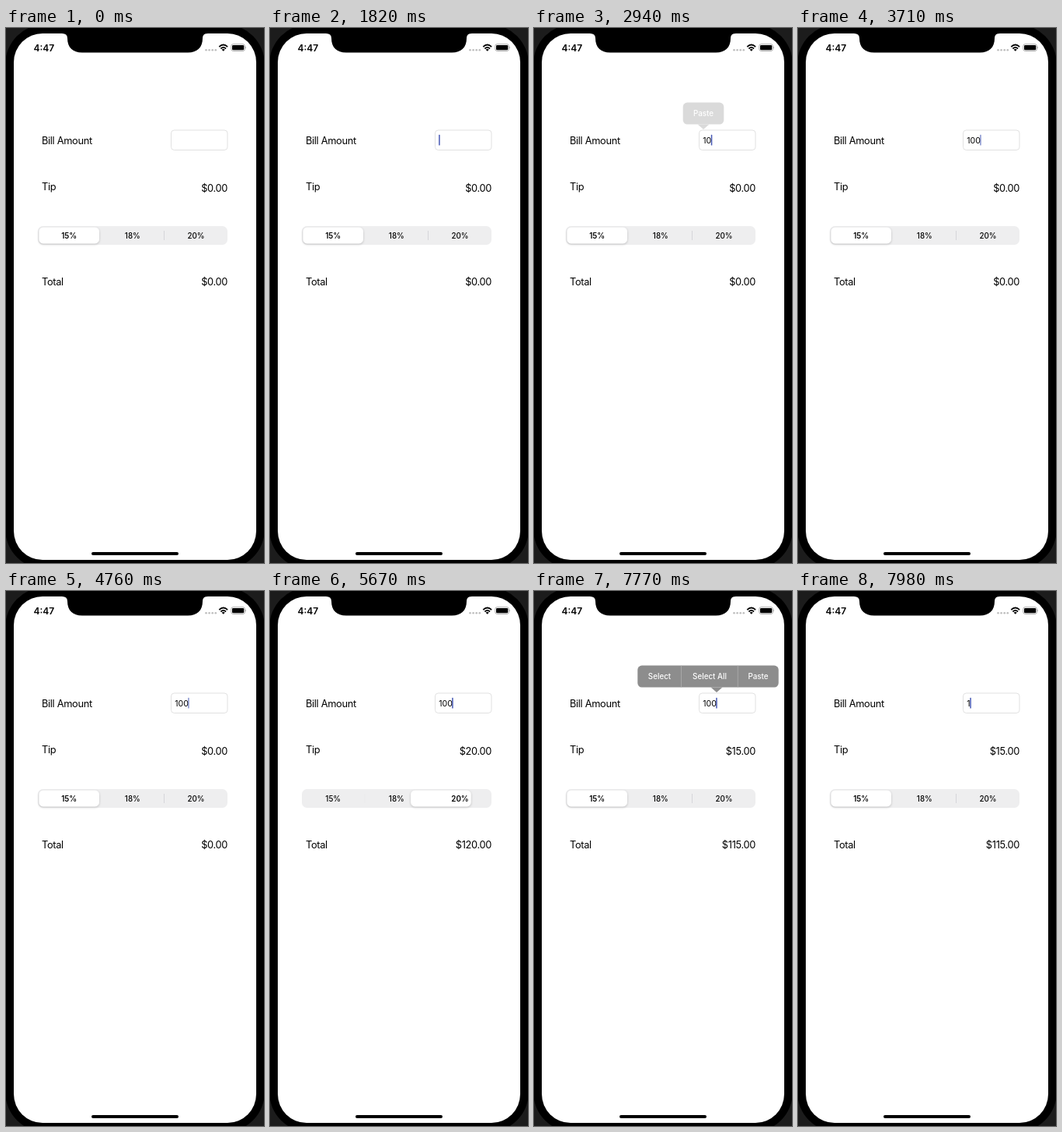
Write an HTML page that moves like this. It is 332 by 686 pixels and loops after 8 s.

```html
<!DOCTYPE html>
<html lang="en">
<head>
<meta charset="utf-8">
<title>Tip calculator</title>
<style>
  html, body { margin: 0; width: 100%; height: 100%; overflow: hidden; background: #1c1c1c; }
  svg { display: block; width: 332px; height: 686px; font: 12.8px Inter, "Liberation Sans", sans-serif; }
  .label { letter-spacing: -.32px; }
  .end, .end text { text-anchor: end; }
  .mid { text-anchor: middle; font-size: 9.8px; font-weight: 500; }
  #thumb { filter: drop-shadow(0 1px 1.5px rgba(0, 0, 0, .2)); }
</style>
</head>
<body>
<svg viewBox="0 0 332 686">
  <rect x="-1" y="-5" width="334" height="699" rx="52"/>
  <rect x="10" y="7" width="312" height="675" rx="37" fill="#fff"/>
  <path d="M72 6V7Q79 7 79 13C79 25 86 31.5 98 31.5H234C246 31.5 253 25 253 13Q253 7 260 7V6Z"/>

  <text x="35.5" y="29.6" font-size="12" font-weight="600">4:47</text>
  <g fill="#bdbdbd">
    <circle cx="257.5" cy="28.3" r="1.3"/><circle cx="261.6" cy="28.3" r="1.3"/>
    <circle cx="265.7" cy="28.3" r="1.3"/><circle cx="269.8" cy="28.3" r="1.3"/>
  </g>
  <g fill="none" stroke="#000" stroke-width="1.8">
    <path d="M274.3 24.2Q279.7 18.8 285.1 24.2M276.4 26.5Q279.7 23.3 283 26.5"/>
  </g>
  <path d="M277.7 27.7Q279.7 26 281.7 27.7L279.7 29.8Z"/>
  <rect x="289.8" y="20.7" width="17.6" height="8.8" rx="2.5" fill="none" stroke="#999" stroke-width=".8"/>
  <rect x="291" y="21.9" width="15.2" height="6.4" rx="1.4"/>
  <path d="M308.4 23.5Q310 25 308.4 26.7Z" fill="#999"/>

  <g class="label">
    <text x="46" y="148.7">Bill Amount</text>
    <text x="46" y="207.6">Tip</text>
    <text x="46" y="329.6">Total</text>
    <g class="end">
      <text id="tip" x="285" y="210.2"></text>
      <text id="total" x="285" y="329.6"></text>
    </g>
  </g>

  <rect x="212.5" y="131" width="72.5" height="25.5" rx="4" fill="#fff" stroke="#dedede" stroke-width=".9"/>
  <text id="bill" x="217.2" y="147.5" font-size="10.6"></text>
  <rect id="caret" y="136.8" width="1.5" height="13.8" rx=".7" fill="#4658b4"/>

  <rect x="41" y="254" width="244" height="24" rx="6.5" fill="#eeeeef"/>
  <g stroke="#d3d3d6" stroke-width=".9">
    <path id="sepA" d="M121.8 260V272"/>
    <path id="sepB" d="M203.5 260V272"/>
  </g>
  <rect id="thumb" y="255.4" width="77.6" height="21" rx="5.4" fill="#fff"/>
  <g class="mid" id="segments">
    <text x="81.2" y="269.5">15%</text>
    <text x="162.8" y="269.5">18%</text>
    <text x="244.5" y="269.5">20%</text>
  </g>

  <g id="pasteMenu" fill="#1e1e1e">
    <rect x="191.7" y="95.6" width="52.6" height="28" rx="5.5"/>
    <path d="M210.5 123.4H225.5L218 130Z"/>
    <text class="mid" x="218" y="113.2" fill="#fff">Paste</text>
  </g>
  <g id="selectMenu" fill="#1e1e1e">
    <rect x="133.3" y="95.6" width="181.4" height="28" rx="5.5"/>
    <path d="M227.5 123.4H242.5L235 130Z"/>
    <path d="M189.5 95.6V123.6M262.3 95.6V123.6" stroke="#666" stroke-width=".7"/>
    <g class="mid" fill="#fff">
      <text x="161.5" y="113.2">Select</text>
      <text x="226" y="113.2">Select All</text>
      <text x="288.5" y="113.2">Paste</text>
    </g>
  </g>

  <rect x="110" y="672" width="112" height="4" rx="2"/>
</svg>
<script>
const LOOP = 8000, STEP = 70, SLIDE = 380, BLINK = 1050;
const $ = id => document.getElementById(id);
const clamp = v => Math.max(0, Math.min(1, v));
const money = n => '$' + n.toFixed(2);

// [start time, value]
const typed = [[0, ''], [2730, '1'], [2940, '10'], [3150, '100'], [7840, '10'], [7980, '1']];
const taps = [[0, 0], [4870, 1], [5520, 2], [6690, 0]];
const rates = [15, 18, 20];
const caretX = [217.2, 221.3, 227.8, 234.2];
const thumbX = i => 42.4 + 81.8 * i;
const indexAt = (list, t) => list.findLastIndex(([start]) => t >= start);

function slide(u) {
  const v = 1 - (1 - clamp(u)) ** 2;
  return v * v * (3 - 2 * v);
}

function caretAlpha(t) {
  if (t < 1820) return 0;
  if (t < 3640 || t >= 7770) return 1;
  const p = (t - 3640) % BLINK;
  return p < 350 ? clamp(1 - p / 210) : clamp((p - 350) / 210);
}

function draw(t) {
  const bill = typed[indexAt(typed, t)][1];
  $('bill').textContent = bill;
  $('caret').setAttribute('x', caretX[bill.length]);
  $('caret').setAttribute('opacity', caretAlpha(t));

  const k = indexAt(taps, t), [start, choice] = taps[k];
  const from = thumbX(k ? taps[k - 1][1] : 0);
  const x = from + (thumbX(choice) - from) * slide((t - start) / SLIDE);
  $('thumb').setAttribute('x', x);
  $('sepA').setAttribute('opacity', clamp((x - 178) / 28));
  $('sepB').setAttribute('opacity', clamp((75 - x) / 30));
  [...$('segments').children].forEach((s, i) => s.style.fontWeight = i === choice ? 600 : 500);

  const tip = k ? rates[choice] : 0;
  $('tip').textContent = money(tip);
  $('total').textContent = money(k ? 100 + tip : 0);

  $('pasteMenu').setAttribute('opacity', clamp(Math.min((t - 2380) / 140, (2985 - t) / 290)));
  $('selectMenu').setAttribute('opacity', clamp(Math.min((t - 7700) / 140, (7960 - t) / 180)));
}

// The screen refreshes in fixed steps.
function tick() {
  const t = performance.now() % LOOP;
  draw(Math.floor(t / STEP) * STEP);
  requestAnimationFrame(tick);
}
tick();
</script>
</body>
</html>
```
